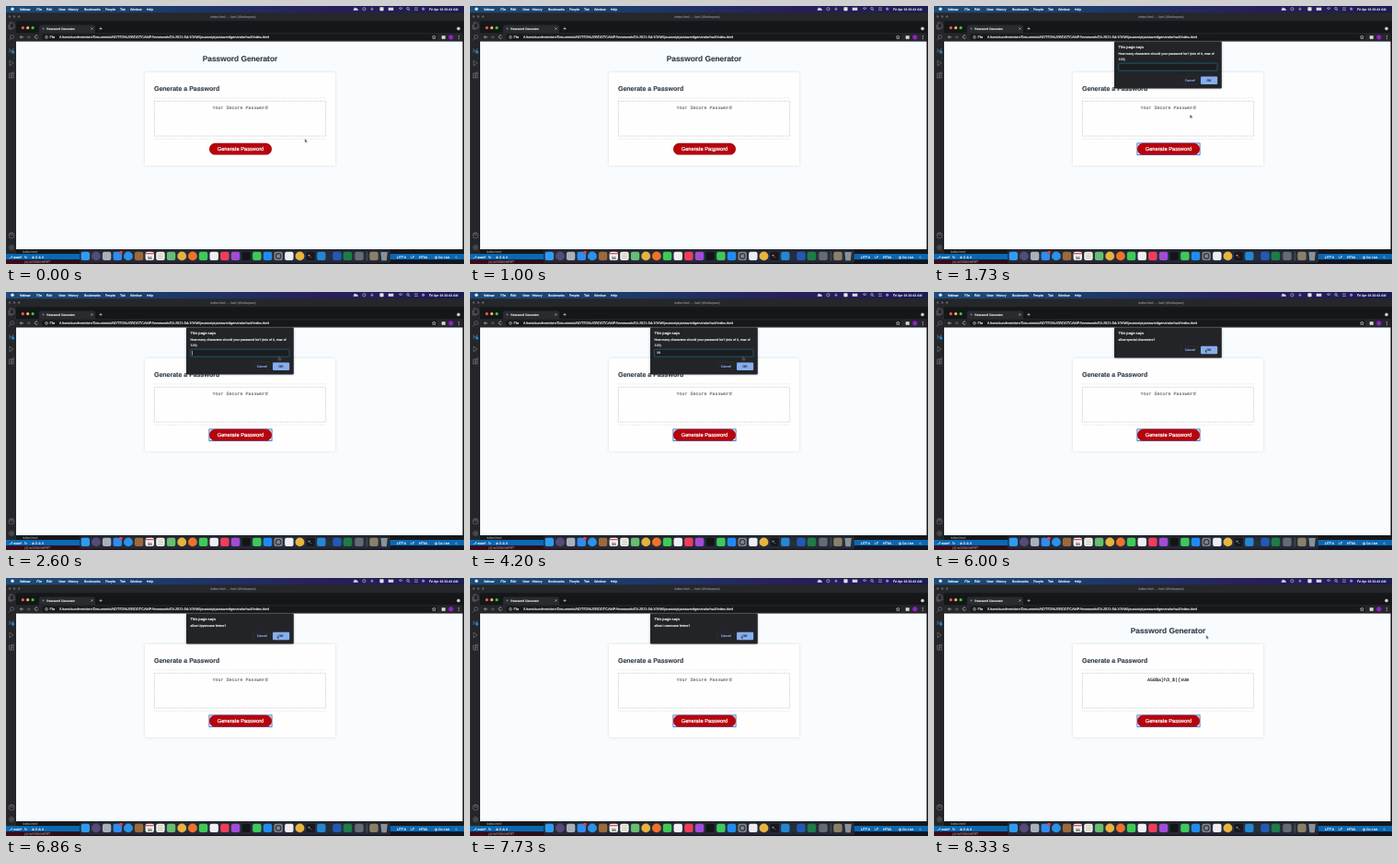
Animation, 498 px wide and 280 px high, one loop 8.4 s. Source, as an HTML page:

```html
<!DOCTYPE html>
<html lang="en">
<head>
<meta charset="utf-8">
<title>Password Generator</title>
<style>
html, body { margin: 0; width: 100%; height: 100%; overflow: hidden; background: #17181b; }
svg { display: block; width: 498px; height: 280px; }
text { font-family: "Liberation Sans", Arial, sans-serif; font-size: 3.56px; color: #f2f4f7; fill: currentColor; stroke: currentColor; stroke-width: .14px; text-rendering: geometricPrecision; white-space: pre; }
.bold { font-weight: 700; }
.mid { text-anchor: middle; }
.dim { color: #7d8086; }
.mono { font: 5.03px "Liberation Mono", "Courier New", monospace; text-anchor: middle; }
.line { fill: none; stroke: #6d7178; stroke-width: .7; }
.lite { fill: none; stroke: #d5d8dd; stroke-width: .6; }
.dash { fill: none; stroke: #b3b7bc; stroke-width: .6; stroke-dasharray: 1.5 1; }
.card { filter: drop-shadow(0 .6px 1.4px #0002); }
.box { filter: drop-shadow(0 .5px 1px #0005); }

.step { animation: 8.4s step-end infinite; }
.focus { animation-name: focus; }
.prompt { animation-name: prompt; }
.confirm { animation-name: confirm; }
.numbers { animation-name: numbers; }
.special { animation-name: special; }
.upper { animation-name: upper; }
.lower { animation-name: lower; }
.empty { animation-name: empty; }
.result { animation-name: result; }
.one { animation-name: one; }
.six { animation-name: six; }
.arrow { animation-name: arrow; }
.hand { animation-name: hand; }
.caret { animation-name: caret; }
.pointer { animation: move 8.4s ease-in-out infinite; }

@keyframes focus { 0% { opacity: 0 } 14.29%, 100% { opacity: 1 } }
@keyframes prompt { 0%, 53.1% { opacity: 0 } 14.29% { opacity: 1 } 100% { opacity: 0 } }
@keyframes confirm { 0%, 92.86% { opacity: 0 } 53.1% { opacity: 1 } 100% { opacity: 0 } }
@keyframes numbers { 0%, 67.38% { opacity: 0 } 53.1% { opacity: 1 } 100% { opacity: 0 } }
@keyframes special { 0%, 76.9% { opacity: 0 } 67.38% { opacity: 1 } 100% { opacity: 0 } }
@keyframes upper { 0%, 86.9% { opacity: 0 } 76.9% { opacity: 1 } 100% { opacity: 0 } }
@keyframes lower { 0%, 92.86% { opacity: 0 } 86.9% { opacity: 1 } 100% { opacity: 0 } }
@keyframes empty { 0% { opacity: 1 } 92.86%, 100% { opacity: 0 } }
@keyframes result { 0% { opacity: 0 } 92.86%, 100% { opacity: 1 } }
@keyframes one { 0% { opacity: 0 } 39.64%, 100% { opacity: 1 } }
@keyframes six { 0% { opacity: 0 } 42.86%, 100% { opacity: 1 } }
@keyframes arrow { 0%, 14.29%, 100% { opacity: 1 } 7.1% { opacity: 0 } }
@keyframes hand { 0%, 14.29%, 100% { opacity: 0 } 7.1% { opacity: 1 } }
@keyframes caret { 0%, 20.2%, 33.33%, 39.64% { opacity: 0 } 14.29%, 26.2% { opacity: 1 } 100% { opacity: 0 } }
@keyframes move {
  0%, .7% { transform: translate(325px, 144.3px) }
  7.86%, 14.29% { transform: translate(264.6px, 154.3px) }
  28%, 62% { transform: translate(296.4px, 70.2px) }
  69%, 92% { transform: translate(294.8px, 62.4px) }
  97%, 100% { transform: translate(296px, 62.2px) }
}
</style>
</head>
<body>
<svg viewBox="0 0 498 280">
  <defs>
    <linearGradient id="bar">
      <stop offset="0" stop-color="#1b4c7b"/><stop offset=".35" stop-color="#1c3a6b"/>
      <stop offset=".7" stop-color="#281f5a"/><stop offset="1" stop-color="#1b1c52"/>
    </linearGradient>
    <linearGradient id="edge">
      <stop offset="0" stop-color="#3a0d18"/><stop offset=".2" stop-color="#240f1c"/><stop offset="1" stop-color="#101522"/>
    </linearGradient>
  </defs>

  <!-- editor behind -->
  <rect width="498" height="280" fill="#17181b"/>
  <rect y="7" width="498" height="9" fill="#26272b"/>
  <rect y="16" width="11" height="253" fill="#25262a"/>
  <g fill="#5e6065"><circle cx="4" cy="11.5" r="1.2"/><circle cx="9" cy="11.5" r="1.2"/><circle cx="14" cy="11.5" r="1.2"/></g>
  <text class="dim mid" x="247" y="12.8">index.html — hw3 (Workspace)</text>
  <g class="line">
    <path d="M4 18h3l2 2v4h-5zM3 20v5h4"/>
    <circle cx="6.5" cy="33.5" r="2"/><path d="M5 35.2l-2 2.3"/>
    <path d="M4 46v5M4 49q4 0 4-3"/>
    <path d="M4 59l4 3-4 3z"/>
    <path d="M3.5 73h2.2v5h-2.2zM5.7 75.5h2.6v2.5h-2.6zM6.5 72h2v2h-2z"/>
    <circle cx="6" cy="247.5" r="1.3"/><circle cx="6" cy="249" r="3"/>
    <circle cx="6" cy="262" r="2.4"/><circle cx="6" cy="262" r=".8"/>
  </g>
  <circle cx="7.6" cy="50" r="1.7" fill="#1684d8"/>
  <text class="dim" x="18" y="267.7">index.html</text>
  <rect y="269" width="498" height="6.3" fill="#0a69b4"/>
  <rect y="275.3" width="498" height="4.7" fill="url(#edge)"/>
  <text x="3" y="273.5">⎇ main*</text>
  <text x="20" y="273.5">↻</text>
  <text x="28" y="273.5">⊗ 0 ⚠ 0</text>
  <text x="425" y="273.5">UTF-8</text><text x="440" y="273.5">LF</text><text x="449" y="273.5">HTML</text>
  <text x="466" y="273.5">◎ Go Live</text><text x="488" y="273.5">♢</text>
  <text class="dim" x="20" y="279.3">(4) WORKSHEET</text>

  <!-- menu bar -->
  <rect width="498" height="7.2" fill="url(#bar)"/>
  <circle cx="7" cy="3.2" r="1.7" fill="#e6e8ec"/>
  <g id="menu"></g>
  <g class="lite">
    <path d="M378 4.5h4.5q0-2-2-2-1-1-2 .2z" fill="#d5d8dd"/>
    <circle cx="389.5" cy="3.2" r="1.6"/><path d="M398 1.5v3.5M396.5 3.2h3"/>
    <rect x="416" y="2" width="5" height="2.6" fill="#d5d8dd"/>
    <path d="M427 2.6q2.2-1.7 4.4 0M428 3.7q1.2-1 2.4 0"/>
    <circle cx="437" cy="2.8" r="1.3"/><path d="M438 3.8l1.2 1.2"/>
    <path d="M444 2.1h4M444 4.3h4"/>
  </g>
  <rect x="406.4" y="1.2" width="4.2" height="4" rx=".6" fill="#dfe3e8"/>
  <circle cx="453.7" cy="3.2" r="1.6" fill="#a46fd0"/>

  <!-- browser window -->
  <rect x="11" y="18" width="485.5" height="246" rx="2" fill="#151619"/>
  <path d="M34 29.5q2 0 2-2v-5q0-2 2-2h57q2 0 2 2v5q0 2 2 2z" fill="#2a2b2f"/>
  <rect x="11" y="29.3" width="485.5" height="9.2" fill="#26272b"/>
  <rect x="39" y="30.5" width="430" height="6.6" rx="3.3" fill="#17181b"/>
  <circle cx="18.3" cy="23.7" r="1.6" fill="#f45c54"/>
  <circle cx="23.7" cy="23.7" r="1.6" fill="#f5bc35"/>
  <circle cx="29.1" cy="23.7" r="1.6" fill="#38c64a"/>
  <circle cx="40.5" cy="24.4" r="1" fill="#7b8087"/>
  <text x="44.3" y="25.5" style="font-size:3.35px">Password Generator</text>
  <g class="lite">
    <path d="M92.4 23.5l2 2m0-2l-2 2M101.3 24.5h3.4M103 22.8v3.4"/>
    <path d="M19 33.8h-3.6l1.5-1.5m-1.5 1.5l1.5 1.5"/>
    <path class="line" d="M22.5 33.8h3.6l-1.5-1.5m1.5 1.5l-1.5 1.5"/>
    <path d="M34.4 32.5a1.7 1.7 0 1 0 .2 1.8"/>
    <circle cx="44" cy="33.8" r="1.4"/><path d="M44 33.5v1"/>
    <path d="M465.3 31.9l.6 1.3 1.4.1-1.1 1 .4 1.4-1.3-.7-1.3.7.4-1.4-1.1-1 1.4-.1z"/>
    <path d="M474 32.5h3.4v3H474z" fill="#d5d8dd"/>
    <circle cx="492" cy="24.5" r="1.5" fill="#d5d8dd"/>
  </g>
  <circle cx="483.8" cy="33.8" r="2.6" fill="#8d22c4"/>
  <g fill="#d5d8dd"><circle cx="492.3" cy="32.2" r=".5"/><circle cx="492.3" cy="33.8" r=".5"/><circle cx="492.3" cy="35.4" r=".5"/></g>
  <text x="47.5" y="35.2">File</text>
  <text x="58" y="35.2" style="font-size:3.86px">/Users/sundermoken/Documents/NOTES%20BOOTCAMP/homework/03-2021-04-10HW/javascriptpasswordgeneratorhw3/index.html</text>

  <!-- page -->
  <rect x="11" y="38.5" width="485.5" height="225.5" fill="#f9fcfe"/>
  <text class="bold mid" x="254.5" y="59.6" style="font-size:8.33px;color:#303c48">Password Generator</text>
  <rect class="card" x="151" y="72" width="207" height="101" rx="1.5" fill="#fefefe"/>
  <text class="bold" x="161" y="92.2" style="font-size:7px;color:#303c48">Generate a Password</text>
  <path d="M161 99.8h187M161 144.4h187" class="dash" opacity=".5"/>
  <rect x="161.3" y="103.3" width="186.4" height="37.8" class="dash"/>
  <text class="mono step empty" x="254.6" y="112" style="color:#6c6c6c">Your Secure Password</text>
  <text class="mono step result" x="254.6" y="112" style="color:#222">A50$a}h3_$|{sUm</text>
  <rect class="step focus" x="220.9" y="148.9" width="68.2" height="12.6" fill="#e6eefa" stroke="#2463b4" stroke-width=".8"/>
  <rect x="221" y="148.8" width="68" height="12.7" rx="6.35" fill="#b4050f"/>
  <text class="mid" x="255" y="157.1" style="font-size:5.72px;color:#fff;stroke-width:.22px">Generate Password</text>

  <!-- dialogs -->
  <g class="step prompt">
    <rect class="box" x="196" y="38.5" width="116.8" height="51" rx="1.2" fill="#232427"/>
    <text x="200.5" y="53.3">How many characters should your password be? (min of 8, max of</text>
    <text x="200.5" y="58.6">128)</text>
    <rect x="200.7" y="62.2" width="107.3" height="8" rx=".8" fill="#1b1d20" stroke="#1f647b" stroke-width=".8"/>
    <rect class="step caret" x="202.4" y="63.8" width=".6" height="4.8" fill="#e6e8ec"/>
    <text class="step one" x="203" y="67.4">1</text><text class="step six" x="205" y="67.4">6</text>
    <g class="actions" transform="translate(0 17.7)"></g>
  </g>
  <g class="step confirm">
    <rect class="box" x="196" y="38.5" width="116.8" height="33" rx="1.2" fill="#232427"/>
    <text class="step numbers" x="200.5" y="53.3">allow numbers?</text>
    <text class="step special" x="200.5" y="53.3">allow special characters?</text>
    <text class="step upper" x="200.5" y="53.3">allow Uppercase letters?</text>
    <text class="step lower" x="200.5" y="53.3">allow Lowercase letters?</text>
    <g class="actions"></g>
  </g>

  <!-- dock -->
  <rect x="80" y="264.8" width="338" height="14" rx="2.6" fill="#262c38" opacity=".94"/>
  <g id="dock"></g>

  <g class="pointer">
    <path class="step arrow" transform="scale(.85)" d="M0 0v4.2l1-.9.7 1.6.8-.4-.7-1.5h1.3z" fill="#111" stroke="#fff" stroke-width=".3"/>
    <path class="step hand" transform="scale(.75)" d="M-.5 0q.6-.5 1 0v1.6l2 .5q.5.3.3 1.4l-.5 1.5h-2.6l-1.7-2 .5-.5 1 .6z" fill="#fff" stroke="#222" stroke-width=".4"/>
  </g>
</svg>
<script>
const fill = (sel, html) => document.querySelectorAll(sel).forEach(el => el.innerHTML += html);
const label = (x, y, s, attrs = '') => `<text x="${x}" y="${y}" ${attrs}>${s}</text>`;

const menu = { File: 33.3, Edit: 44, View: 57, History: 67.5, Bookmarks: 85, People: 108, Tab: 124, Window: 135, Help: 153 };
fill('#menu', label(15, 4.6, 'Velmar', 'class="bold"')
  + Object.entries(menu).map(([name, x]) => label(x, 4.6, name)).join('')
  + label(460, 4.6, 'Fri Apr 16 10:43 AM'));

fill('.actions', `<rect x="268.5" y="58.8" width="19.5" height="8.4" rx="1" fill="none" stroke="#303338" stroke-width=".5"/>
  <rect x="290" y="58.7" width="18.2" height="8.6" rx="1" fill="#86aef0"/>`
  + label(278.3, 64.2, 'Cancel', 'class="mid" style="color:#86aef0"')
  + label(299, 64.2, 'OK', 'class="mid" style="color:#202124"'));
fill('.prompt, .confirm', label(200.5, 46, 'This page says', 'style="font-size:4.1px;color:#fff"'));

const icon = (x, color, round) => round
  ? `<circle cx="${x}" cy="271.4" r="4.9" fill="${color}"/>`
  : `<rect x="${x - 4.7}" y="266.7" width="9.4" height="9.4" rx="2" fill="${color}"/>`;
const apps = ('#2f9bf0 #574a78o #a9b0ba #2f8df0 #2b93e8o #9b6a3b #f4f4f4 #f6f3e4 #67bd70 #e6b33do #f0722co '
  + '#3fca58 #f1eff0 #f03d59 #a34bd6 #151518 #3fc85a #208cf0 #80858d #f0edf0 #e5b53fo #18191c #2387d1').split(' ');
const dock = apps.map((c, i) => icon(86.3 + i * 11.66, c.slice(0, 7), c.length > 7));
dock.push(icon(360, '#2459b0'), icon(371.5, '#1d7c48'), icon(384, '#656b70'), icon(400, '#8a8065'));
dock.push('<path d="M407.4 267h7.4l-1 9.2h-5.4z" fill="#8b9199"/>');
// calendar, notes, settings and terminal details
dock.push('<path d="M152 268.7h8.6" stroke="#e44a43" stroke-width="1.3"/>',
  label(156.3, 274.6, '16', 'class="mid" style="color:#333;font-size:4.6px"'),
  '<path d="M165 269h6M165 271.4h6M165 273.8h6" stroke="#aaa" stroke-width=".7"/>',
  '<circle cx="296.2" cy="271.4" r="2.8" fill="none" stroke="#33363b" stroke-width="1.2"/>',
  label(328.5, 271.6, '&gt;_'),
  '<path d="M392.3 266.5v10" stroke="#777e88" stroke-width=".5"/>',
  '<circle cx="125" cy="267.5" r="1.8" fill="#ee4039"/>');
fill('#dock', dock.join(''));
</script>
</body>
</html>
```
